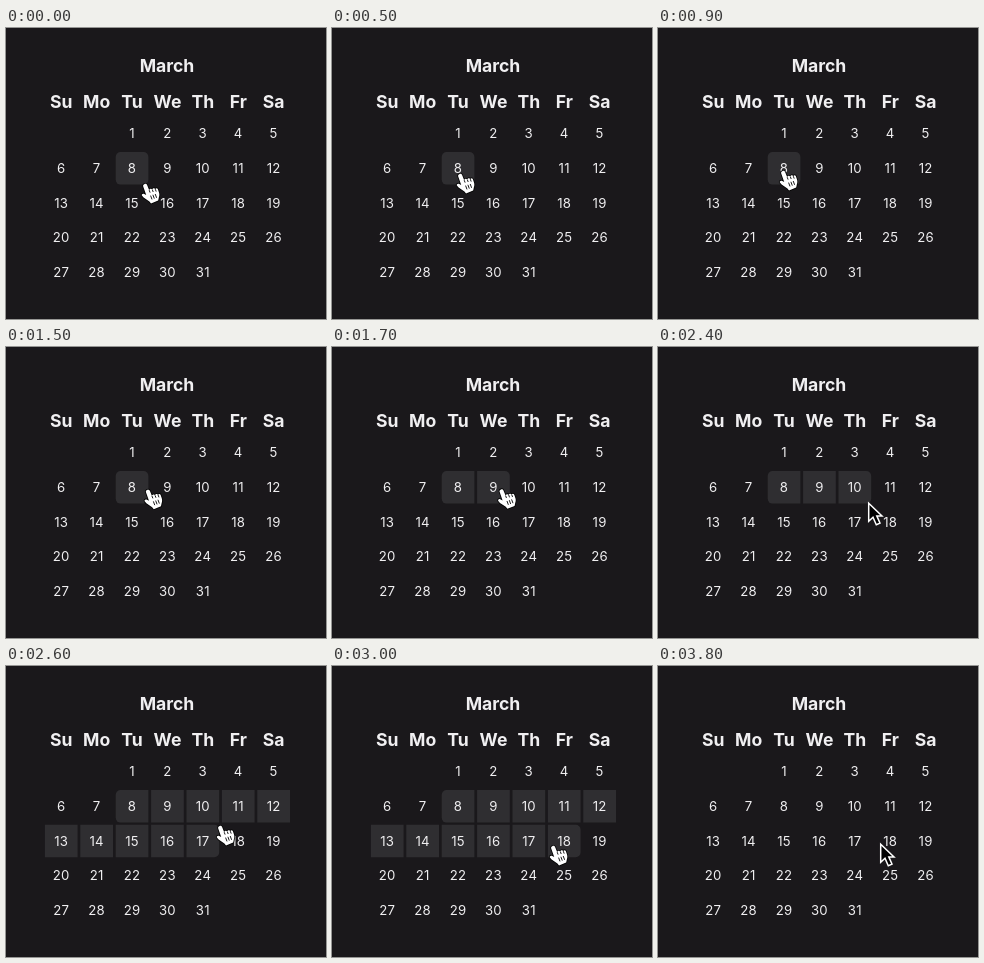
These frames come from a looping animation (320x291 px, 3.9 s). An HTML page:

```html
<!DOCTYPE html>
<html lang="en">
<head>
<meta charset="utf-8">
<title>Calendar range selection</title>
<style>
  html, body { margin: 0; width: 100%; height: 100%; overflow: hidden; background: #1a181b; }
  svg { display: block; width: 320px; height: 291px; }
  text { font: 13.2px Inter, sans-serif; letter-spacing: .3px; fill: #f0eff1; text-anchor: middle; }
  .head { font-size: 17.6px; font-weight: 700; letter-spacing: 0; }
  .cell { fill: #2f2e31; }
</style>
</head>
<body>
<svg viewBox="0 0 320 291">
  <g id="cells"></g>
  <g id="labels"></g>
  <g id="cursor">
    <g id="hand">
      <path fill="#fff" stroke="#000" stroke-width="1.6" stroke-linejoin="round" paint-order="stroke"
        d="M3.6 1c1.1-.4 2.1.1 2.5 1.1L8.2 7.2c.1-1.4 2.4-2 3.1-.6c.2-1.3 2.3-1.8 3-.4c.4-1.1 2.1-1.2 2.6.1L18 9.6c.6 1.8.4 3.3-.1 4.7L17.2 17.6L10 20.4L8.4 18.4L2.6 14.6L.9 12.6c-.7-1.1.6-2.4 1.9-1.8L5.2 12L2.2 3.4c-.4-1 .2-2 1.4-2.4z"/>
      <path fill="none" stroke="#000" stroke-width=".9"
        d="M8.2 7.2l.9 2.4M11.3 6.6l.9 2.4M14.3 6.2l.9 2.4M9.6 12.6l1.4 3.8M11.9 11.8l1.4 3.8M14.2 11l1.4 3.8"/>
    </g>
    <path id="arrow" transform="translate(4 2)" fill="#000" stroke="#fff" stroke-width="1.5"
      d="M.7 1.2V19.2L5 15.2L8.3 22.8L12 21.2L8.8 13.9H14z"/>
  </g>
</svg>
<script>
const STEP = 100, STEPS = 39, FIRST = 8;
const LEFT = 38.9, TOP = 124, DX = 35.4, DY = 34.7, W = 32.7, H = 32.6, R = 5;
const $ = id => document.getElementById(id);

const linear = u => u;
const easeOut = u => u * (3 - u) / 2;

// step, x, y, easing into this point
const path = [
  [0, 135, 155], [5, 124, 145, easeOut], [6, 124, 145], [9, 121, 142],
  [14, 121, 142], [20, 192, 141, easeOut], [24, 206, 153], [26, 210, 159],
  [30, 217, 179], [37, 217, 179], [38, 218, 175]
];
// step, last selected day (0 clears the range)
const ranges = [[0, 8], [16, 9], [18, 10], [25, 17], [27, 18], [38, 0]];
const arrowSteps = [24, 38];

function add(parent, tag, attrs, text = "") {
  const el = document.createElementNS("http://www.w3.org/2000/svg", tag);
  for (const key in attrs) el.setAttribute(key, attrs[key]);
  el.textContent = text;
  return parent.appendChild(el);
}

const colX = c => LEFT + c * DX;
const label = (x, y, text, cls = "") => add($("labels"), "text", { x, y, class: cls }, text);

function cellPath(x, y, l, r) {
  return `M${x + l} ${y}H${x + W - r}a${r} ${r} 0 0 1 ${r} ${r}V${y + H - r}a${r} ${r} 0 0 1 ${-r} ${r}` +
    `H${x + l}a${l} ${l} 0 0 1 ${-l} ${-l}V${y + l}a${l} ${l} 0 0 1 ${l} ${-l}z`;
}

label(161, 44.2, "March", "head");
["Su", "Mo", "Tu", "We", "Th", "Fr", "Sa"].forEach((name, c) =>
  label(colX(c) + W / 2, 79.8, name, "head"));

const days = [];
for (let d = 1; d <= 31; d++) {
  const x = colX((d + 1) % 7), y = TOP + (Math.floor((d + 1) / 7) - 1) * DY;
  days.push({ d, x, y, cell: add($("cells"), "path", { class: "cell" }) });
  label(x + W / 2, y + 20.9, d);
}

function cursorAt(step) {
  const i = path.findIndex(p => p[0] >= step);
  if (i < 1) return path[0].slice(1);
  const [s0, x0, y0] = path[i - 1], [s1, x1, y1, ease = linear] = path[i];
  const u = ease((step - s0) / (s1 - s0));
  return [x0 + (x1 - x0) * u, y0 + (y1 - y0) * u];
}

function draw(now) {
  const step = Math.floor(now / STEP) % STEPS;
  const last = ranges.filter(r => r[0] <= step).pop()[1];
  for (const { d, x, y, cell } of days) {
    const on = d >= FIRST && d <= last;
    cell.setAttribute("d", on ? cellPath(x, y, d === FIRST ? R : 0, d === last ? R : 0) : "");
  }
  const isArrow = arrowSteps.includes(step);
  $("hand").style.display = isArrow ? "none" : "";
  $("arrow").style.display = isArrow ? "" : "none";
  $("cursor").setAttribute("transform", `translate(${cursorAt(step)})`);
}

const start = performance.now();
function tick() {
  draw(performance.now() - start);
  requestAnimationFrame(tick);
}
tick();
</script>
</body>
</html>
```
